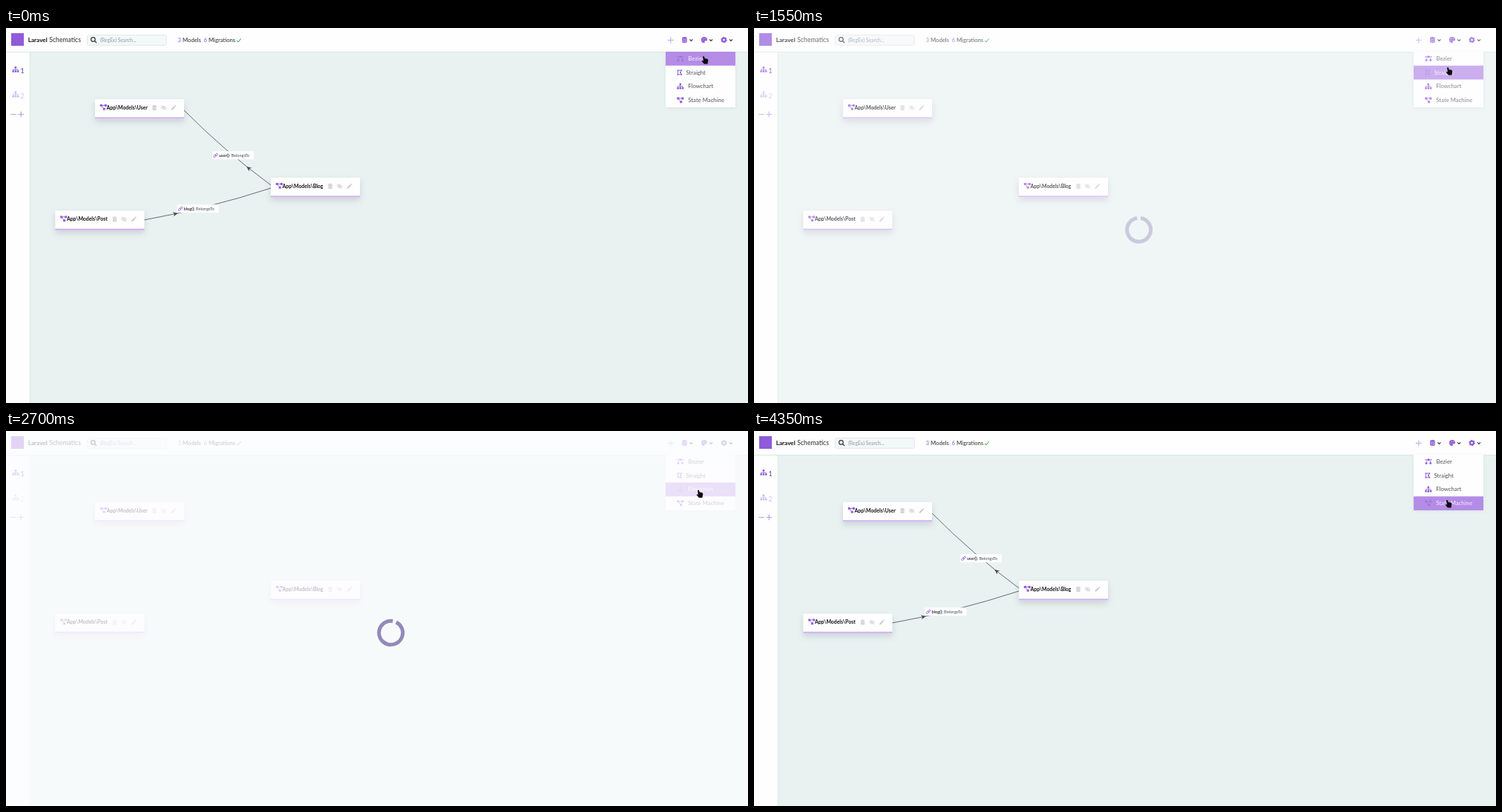
These frames come from a looping animation (1000x506 px, 4.6 s). An HTML page:

```html
<!DOCTYPE html>
<html lang="en">
<head>
<meta charset="utf-8">
<title>Schematics</title>
<style>
  html, body { margin: 0; width: 100%; height: 100%; overflow: hidden; background: #e9f2f1; }
  svg { display: block; }
  #stage { width: 100%; height: 100%; }
  text { font-family: Lato, "Open Sans", sans-serif; fill: #2b2b33; white-space: pre; }
  .bold { font-weight: 700; fill: #111; }
  .purple { color: #8f5bd9; }
  .pale { color: #cdb8f2; }
  .grey { color: #cccccf; }
  .dark { color: #33333b; }
  .card { filter: drop-shadow(0 4px 4px rgba(40, 50, 70, .16)); }
  .menu { filter: drop-shadow(0 1px 2px rgba(40, 50, 70, .08)); }
  .wire { fill: none; stroke: #50565b; stroke-width: .85; }
  .row text { fill: #55555d; font-size: 7.75px; }
  .row rect { fill: none; }
  .row.on rect { fill: #b48ce6; }
  .row.on text { fill: #f7f0ff; }
  .row.on use { color: #a074da; }
</style>
</head>
<body>
<svg id="stage" viewBox="0 0 1000 506" preserveAspectRatio="none">
  <defs>
    <g id="diagram" fill="currentColor">
      <path d="M0 0h3v3h-3zM6 0h3v3h-3zM3.9 4.8h3v3h-3z"/>
      <path d="M2.5 1.5H6.5M2 2L5 6" fill="none" stroke="currentColor" stroke-width=".8"/>
    </g>
    <g id="bezier" fill="currentColor">
      <path d="M3.3 .3h2.6v2.6h-2.6zM.5 5h2.6v2.6h-2.6zM6.1 5h2.6v2.6h-2.6z"/>
      <circle cx=".8" cy="1.6" r=".8"/><circle cx="8.4" cy="1.6" r=".8"/>
      <path d="M1 1.6H8.2M3.4 1.8Q1.8 2.6 1.8 5M5.8 1.8Q7.4 2.6 7.4 5" fill="none" stroke="currentColor" stroke-width=".7"/>
    </g>
    <g id="polygon" fill="none" stroke="currentColor">
      <path d="M1.2 1.2H6L4.6 4 6 6.8H1.2z" stroke-width=".9"/>
      <path d="M1.2 1.2h.01M6 1.2h.01M4.6 4h.01M6 6.8h.01M1.2 6.8h.01" stroke-width="1.9" stroke-linecap="round"/>
    </g>
    <g id="tree" fill="currentColor">
      <path d="M3.2 0h2.6v2.6h-2.6zM0 5.3h2.5v2.5h-2.5zM3.25 5.3h2.5v2.5h-2.5zM6.5 5.3h2.5v2.5h-2.5z"/>
      <path d="M4.5 2.5V5.4M1.25 5.4V4H7.75V5.4" fill="none" stroke="currentColor" stroke-width=".8"/>
    </g>
    <path id="plus" d="M0 4H8M4 0V8" stroke="currentColor" stroke-width="1.3"/>
    <path id="chevron" d="M.5 .5L2.5 2.5 4.5 .5" fill="none" stroke="currentColor" stroke-width="1.2"/>
    <g id="trash" fill="currentColor">
      <path d="M0 .8h6v.9h-6zM2 0h2v.8h-2z"/>
      <path d="M.5 2.1h5v4.9h-5z"/>
      <path d="M1.8 3V6.2M3 3V6.2M4.2 3V6.2" stroke="#fff" stroke-width=".4"/>
    </g>
    <g id="eye" fill="none" stroke="currentColor" stroke-width=".8">
      <path d="M.3 3Q4 -1.2 7.7 3 4 7.2 .3 3zM.8 -.2L7.2 6.2"/><circle cx="4" cy="3" r="1.1"/>
    </g>
    <path id="pencil" d="M0 7L.5 5 4.2 1.3 5.7 2.8 2 6.5zM4.7 .8L5.3 .2Q5.7 -.1 6.1 .2L6.8 .9Q7.1 1.3 6.8 1.7L6.2 2.3z" fill="currentColor"/>
    <g id="link" fill="none" stroke="currentColor" stroke-width=".9">
      <rect x="-.2" y="2.6" width="3.6" height="2.2" rx="1.1" transform="rotate(-45 1.6 3.7)"/>
      <rect x="2" y=".6" width="3.6" height="2.2" rx="1.1" transform="rotate(-45 3.8 1.7)"/>
    </g>
  </defs>

  <rect width="1000" height="506" fill="#e9f2f1"/>
  <g id="wires"></g>
  <g id="cards"></g>

  <path d="M0 0H1000V32.3H32.3V506H0z" fill="#fdfefd"/>
  <path d="M0 32.5H1000M32.4 32.5V506" stroke="#cfe6e0" stroke-width=".8"/>

  <rect x="7" y="7" width="17" height="17" fill="#8f5bd9"/>
  <text class="bold" x="29.7" y="19.2" font-size="8.2">Laravel</text>
  <text x="58.3" y="19.2" font-size="8.65">Schematics</text>
  <rect x="109.5" y="9.5" width="106.8" height="13.8" rx="2" fill="#f3f8f8" stroke="#dce4e4" stroke-width=".8"/>
  <g fill="none" stroke="#33333b" stroke-width="1.2"><circle cx="117.4" cy="15.4" r="2.8"/><path d="M119.4 17.4L122 20"/></g>
  <text x="127" y="18.7" font-size="6.8" style="fill:#92989d">(RegEx) Search...</text>
  <g font-size="7.7">
    <text x="231.5" y="19" style="fill:#8f5bd9">3</text><text x="238" y="19">Models</text>
    <text x="266.5" y="19" style="fill:#8f5bd9">6</text><text x="273" y="19">Migrations</text>
  </g>
  <path d="M311 16.8L313 18.8 316.6 14.4" fill="none" stroke="#4fb768" stroke-width="1.1"/>

  <use href="#plus" x="891.8" y="12.5" class="pale"/>
  <g class="purple" fill="currentColor">
    <path d="M911 13.2Q914.4 10.9 917.8 13.2V18.9Q914.4 21.2 911 18.9z"/>
    <path d="M911 14.6Q914.4 16.2 917.8 14.6M911 17.2Q914.4 18.8 917.8 17.2" fill="none" stroke="#fff" stroke-width=".6"/>
    <path d="M941 12a4 4 0 1 0 0 8.2q1.2-.4.5-1.6-.2-1.3 1.3-1.3h1.2q1-.2 1-1.4A4 4 0 0 0 941 12z"/>
    <path d="M938.8 16.3h.01M940 14.2h.01M942.4 14.2h.01" stroke="#fff" stroke-width="1.1" stroke-linecap="round"/>
    <circle cx="967.5" cy="16.1" r="2.4" fill="none" stroke="currentColor" stroke-width="2.2"/>
    <circle cx="967.5" cy="16.1" r="3.6" fill="none" stroke="currentColor" stroke-width="1.2" stroke-dasharray="1.9 1.87"/>
  </g>
  <g class="dark">
    <use href="#chevron" x="920.9" y="14.8"/><use href="#chevron" x="947.6" y="14.8"/><use href="#chevron" x="974.5" y="14.8"/>
  </g>

  <g font-size="9.6">
    <use href="#tree" x="8.4" y="52" class="purple"/><text x="19.2" y="61" style="fill:#6a45a8">1</text>
    <use href="#tree" x="8.4" y="85.6" class="pale"/><text x="19.2" y="94.6" style="fill:#d6c6f3">2</text>
  </g>
  <path d="M6.2 116.5H13.6M16.4 116.5H24M20.2 112.7V120.3" stroke="#b99fe8" stroke-width="1.2"/>

  <g class="menu"><rect x="889" y="32" width="94" height="75" fill="#fefefe"/></g>
  <g id="rows"></g>

  <g id="veil">
    <rect id="haze" width="1000" height="506" fill="#fdfcff"/>
    <circle id="spinner" cx="518.7" cy="272.3" r="16" fill="none" stroke="#928ab9" stroke-width="5" pathLength="100" stroke-dasharray="95 5" stroke-dashoffset="-2.5"/>
  </g>
  <path id="hand" d="M1.6 1.2Q2.4-.2 3.4 1L4.2 3.6 7.6 4.2Q9 4.6 8.8 6.2L8.4 8.6 8 11H3.4L.4 7.6Q-.2 6.4 1.2 6.4L2.4 7z" fill="#0b0b0d"/>
</svg>

<script>
const $ = id => document.getElementById(id);
const LOOP = 4600, ROW = 18.75, MENU_TOP = 32, HAZE = 0.75;

// Each layout: wire from Blog to User, wire from Post to Blog, arrow and label positions along them.
const layouts = {
  state: ['M357 212Q294.5 166.2 240 111', 'M186 259Q273 243.5 357 216', .245, .42],
  bezier: ['M357 214.5C297 214.5 299 109 240 109', 'M186 259.5C240 259.5 303 214.5 357 214.5', .18, .39],
  straight: ['M357 214.5H347.5L250 109H240', 'M186 259.5H196L347.5 214.5H357', .2, .4],
  flow: ['M357 214.2H289Q287.5 214.2 287.5 212.7V110.5Q287.5 109 286 109H240',
         'M186 259.5H286Q287.5 259.5 287.5 258V216Q287.5 214.6 289 214.6H357', .2, .4]
};
const layoutTimes = [[0, 'state'], [450, ''], [550, 'bezier'], [1550, ''], [1750, 'straight'],
  [2450, ''], [2750, 'flow'], [4250, ''], [4350, 'state']];
const hazeTimes = [[0, 0], [1550, .3], [1600, .6], [1650, HAZE], [1700, HAZE], [1750, 0],
  [2450, .3], [2500, .6], [2550, HAZE], [2600, HAZE], [2750, 0], [4250, .4], [4300, HAZE], [4350, 0]];
const handTimes = [[0, 937.5, 37.5], [1150, 932.5, 52.5], [2000, 930.5, 79], [3150, 931.5, 90], [3600, 931.5, 92.5]];

$('cards').innerHTML = [['User', 120, 96], ['Blog', 357, 202], ['Post', 66.4, 246.4]].map(([name, x, y]) => `
  <g transform="translate(${x} ${y})">
    <g class="card"><rect width="120" height="26.4" rx="1" fill="#fefefe"/></g>
    <rect y="24.4" width="120" height="2" fill="#d0aeef"/>
    <use href="#diagram" x="6.8" y="7" class="purple"/>
    <text class="bold" x="15.5" y="13.8" font-size="6.9">App\\Models\\${name}</text>
    <g class="grey"><use href="#trash" x="77" y="8"/><use href="#eye" x="88.6" y="8.6"/><use href="#pencil" x="102.4" y="8"/></g>
  </g>`).join('');

$('rows').innerHTML = [['Bezier', 'bezier', 919.5], ['Straight', 'polygon', 916.5],
  ['Flowchart', 'tree', 919.3], ['State Machine', 'diagram', 919.3]].map(([name, icon, x], i) => {
    const y = MENU_TOP + i * ROW;
    return `<g class="row"><rect x="889" y="${y}" width="94" height="${ROW}"/>
      <use href="#${icon}" x="904.3" y="${y + 5.2}" class="purple"/><text x="${x}" y="${y + 11.8}">${name}</text></g>`;
  }).join('');
const rows = [...$('rows').children];

function addWire(group, d, name, arrowAt, labelAt) {
  group.insertAdjacentHTML('beforeend', `<path class="wire" d="${d}"/>`);
  const path = group.lastElementChild, length = path.getTotalLength();
  const point = part => path.getPointAtLength(part * length);
  const a = point(arrowAt - .01), b = point(arrowAt + .01), tip = point(arrowAt), mid = point(labelAt);
  const angle = Math.atan2(b.y - a.y, b.x - a.x) * 180 / Math.PI;
  group.insertAdjacentHTML('beforeend', `
    <path d="M3.3 0L-3.3-3-1.3 0-3.3 3z" fill="#3f4549" transform="translate(${tip.x} ${tip.y}) rotate(${angle})"/>
    <g transform="translate(${mid.x - 28} ${mid.y - 5.5})">
      <rect width="56" height="11" rx="1" fill="#fdfefe"/>
      <use href="#link" x="1.8" y="2.8" class="purple"/>
      <text x="9" y="7.4" font-size="5.6" style="fill:#50505a"><tspan style="fill:#25252b;font-weight:600">${name}():</tspan> BelongsTo</text>
    </g>`);
}

const wireGroups = Object.entries(layouts).map(([key, [toUser, toBlog, arrowAt, labelAt]]) => {
  const group = document.createElementNS('http://www.w3.org/2000/svg', 'g');
  $('wires').append(group);
  addWire(group, toUser, 'user', arrowAt, labelAt);
  addWire(group, toBlog, 'blog', arrowAt, labelAt);
  return [key, group];
});

const latest = (list, t) => list.findLast(entry => entry[0] <= t);

function handPosition(t) {
  if (t < 900 || t >= 1150) return latest(handTimes, t).slice(1);
  const part = (Math.floor((t - 900) / 50) + 1) / 6, ease = 1 - (1 - part) ** 2;
  return [937.5 - 5 * ease, 37.5 + 15 * ease];
}

function render(t) {
  const layout = latest(layoutTimes, t)[1];
  for (const [key, group] of wireGroups) group.style.display = key === layout ? '' : 'none';

  const [x, y] = handPosition(t);
  $('hand').setAttribute('transform', `translate(${x} ${y})`);
  const active = Math.floor((y - MENU_TOP) / ROW);
  rows.forEach((row, i) => row.classList.toggle('on', i === active));

  const [since, haze] = latest(hazeTimes, t);
  $('veil').style.display = haze ? '' : 'none';
  $('haze').setAttribute('opacity', haze);
  $('spinner').setAttribute('opacity', haze / HAZE);
  $('spinner').setAttribute('transform', `rotate(${(since - 2550) * .36 - 90} 518.7 272.3)`);
}

const start = performance.now();
function tick() {
  render((performance.now() - start) % LOOP);
  requestAnimationFrame(tick);
}
tick();
</script>
</body>
</html>
```
